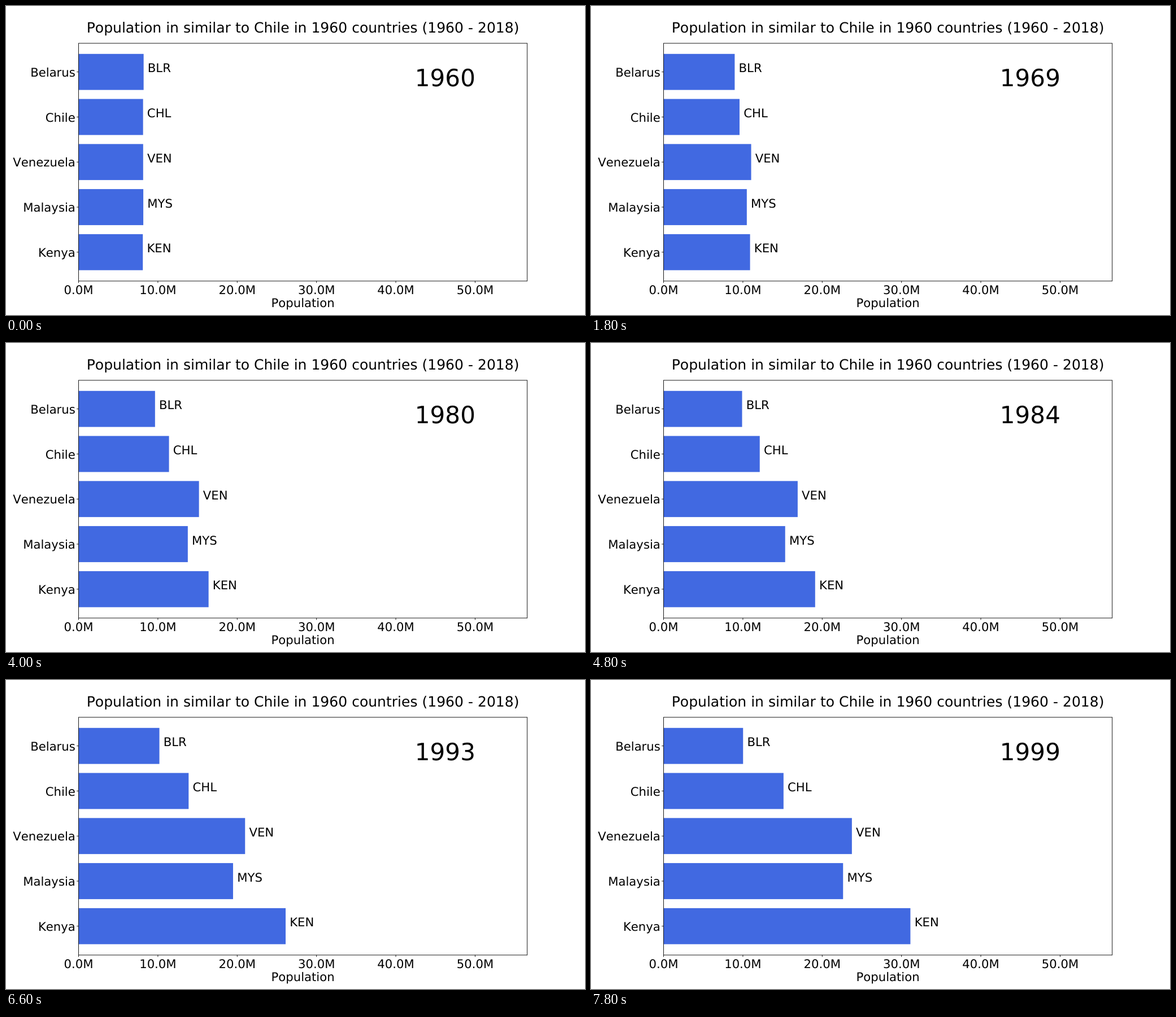
Write an HTML page that moves like this. It is 1025x547 px and loops after 8 s.

```html
<!DOCTYPE html>
<html lang="en">
<head>
<meta charset="utf-8">
<title>Population by year</title>
<style>
  html, body { margin: 0; width: 100%; height: 100%; overflow: hidden; background: #fff; }
  svg { display: block; width: 1025px; height: 547px; }
  text { font-family: "DejaVu Sans", Verdana, sans-serif; font-kerning: none; text-rendering: geometricPrecision; }
  .axis { fill: none; stroke: #000; stroke-width: 0.9; }
</style>
</head>
<body>
<svg id="chart" viewBox="0 0 1025 547"></svg>
<script>
const STEP = 200, LOOP = 8000, FIRST_YEAR = 1960;
const LEFT = 128.5, RIGHT = 922.7, TOP = 66, BOTTOM = 486.9;
const CENTER = (LEFT + RIGHT) / 2;
const PX_PER_M = 14.04, PITCH = 79.77, BAR_H = 63.8, BAR_TOP = 84.8;

// Population in millions at the start of each decade.
const ROWS = [
  { name: "Belarus", code: "BLR", pop: [8.2, 9.04, 9.64, 10.19, 10] },
  { name: "Chile", code: "CHL", pop: [8.13, 9.74, 11.4, 13.27, 15.33] },
  { name: "Venezuela", code: "VEN", pop: [8.14, 11.39, 15.18, 19.63, 24.2] },
  { name: "Malaysia", code: "MYS", pop: [8.16, 10.77, 13.77, 18, 23.15] },
  { name: "Kenya", code: "KEN", pop: [8.1, 11.3, 16.39, 23.7, 31.95] }
];

const svg = document.getElementById("chart");

function add(tag, attrs, content = "") {
  const el = document.createElementNS("http://www.w3.org/2000/svg", tag);
  for (const key in attrs) el.setAttribute(key, attrs[key]);
  el.textContent = content;
  return svg.appendChild(el);
}

function label(content, x, y, anchor = "start", size = 21.2) {
  return add("text", { x, y, "text-anchor": anchor, "font-size": size }, content);
}

// Catmull-Rom curve through the decades, extended straight at both ends.
function valueAt(pop, year) {
  const i = Math.floor(year / 10), u = year / 10 - i;
  const b = pop[i], c = pop[i + 1];
  const a = pop[i - 1] ?? 2 * b - c;
  const d = pop[i + 2] ?? 2 * c - b;
  return b + u / 2 * (c - a + u * (2 * a - 5 * b + 4 * c - d + u * (3 * (b - c) + d - a)));
}

ROWS.forEach((row, i) => {
  const y = BAR_TOP + i * PITCH, mid = y + BAR_H / 2;
  row.bar = add("rect", { x: LEFT, y, height: BAR_H, fill: "#4169e1" });
  row.tag = label(row.code, 0, mid + 0.7);
  label(row.name, 122.8, mid + 8.1, "end");
  add("path", { class: "axis", d: `M${LEFT} ${mid}h-3.3` });
});

for (let m = 0; m <= 50; m += 10) {
  const x = LEFT + m * PX_PER_M;
  add("path", { class: "axis", d: `M${x} ${BOTTOM}v3.3` });
  label(m.toFixed(1) + "M", x, 510, "middle");
}
add("rect", { class: "axis", x: LEFT, y: TOP, width: RIGHT - LEFT, height: BOTTOM - TOP });

label("Population in similar to Chile in 1960 countries (1960 - 2018)", CENTER, 47, "middle", 25.05);
label("Population", CENTER, 533, "middle");
const yearText = label("", 723.8, 142.2, "start", 42.1);

function draw(ms) {
  const year = Math.floor((ms % LOOP) / STEP);
  yearText.textContent = FIRST_YEAR + year;
  for (const row of ROWS) {
    const width = valueAt(row.pop, year) * PX_PER_M;
    row.bar.setAttribute("width", width);
    row.tag.setAttribute("x", LEFT + width + 7.2);
  }
}

const start = performance.now();
function tick(now) {
  draw(Math.max(0, now - start));
  requestAnimationFrame(tick);
}
draw(0);
requestAnimationFrame(tick);
</script>
</body>
</html>
```
